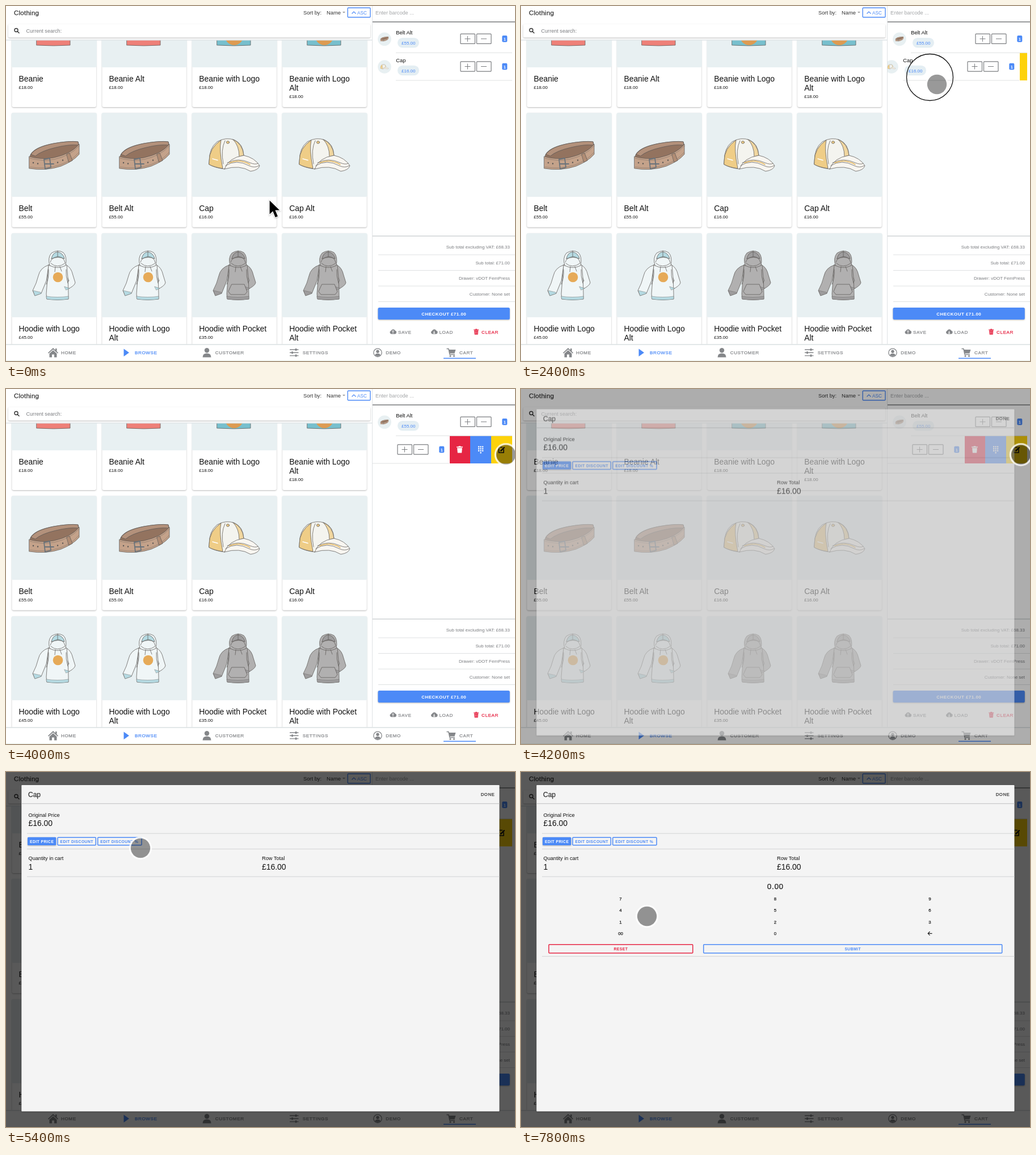
Animation, 897 px wide and 625 px high, one loop 8000 ms. Source, as an HTML page:

```html
<!DOCTYPE html>
<html lang="en">
<head>
<meta charset="utf-8">
<title>Shop till</title>
<style>
html, body { margin: 0; width: 100%; height: 100%; overflow: hidden; background: #fff; }
svg { display: block; font-family: "Liberation Sans", Arial, sans-serif; --blue: #4c8af7; --red: #e62543; --tint: #e8f0f2; }
.lift { filter: drop-shadow(0 1px 1px rgba(0, 0, 0, .28)); }
.medium { fill: currentColor; stroke: currentColor; stroke-width: .25; }
.caps { letter-spacing: .6px; font-size: 8.1px; }
.small { letter-spacing: .42px; font-size: 6.8px; font-weight: bold; }
.mid { text-anchor: middle; }
.end { text-anchor: end; }
.line { fill: none; stroke: currentColor; }
.ink { stroke: #5c5856; stroke-width: .75; stroke-linejoin: round; stroke-linecap: round; }
.lining { fill: var(--lining); }

/* Every segment advances once per 200 ms (2.5%). */
#row, #arrow, #touch, #ring, #veil, #modal, #keys { animation: 8s step-end -10ms infinite; }
#row { animation-name: swipe; }
#arrow { animation-name: point; }
#touch { animation-name: drag; }
#ring { animation-name: press; }
#veil { animation-name: dim; }
#modal { animation-name: rise; }
#keys { animation-name: reveal; }

@keyframes swipe {
  0%, 27.5% { transform: translate(0, 0); }
  30% { transform: translate(-14px, 0); animation-timing-function: steps(3); }
  37.5%, 100% { transform: translate(-111px, 0); }
}
@keyframes point {
  0% { transform: translate(464px, 341px); opacity: 1; animation-timing-function: steps(6); }
  15% { transform: translate(700px, 225px); opacity: 1; animation-timing-function: steps(4); }
  25% { transform: translate(720px, 125px); opacity: 1; }
  27.5%, 100% { transform: translate(720px, 125px); opacity: 0; }
}
@keyframes drag {
  0% { transform: translate(747px, 138px); opacity: 0; }
  27.5% { transform: translate(747px, 138px); opacity: 1; }
  30% { transform: translate(733px, 138px); opacity: 1; animation-timing-function: steps(3); }
  37.5% { transform: translate(636px, 138px); opacity: 1; }
  42.5% { transform: translate(636px, 138px); opacity: 1; animation-timing-function: steps(3); }
  50% { transform: translate(881px, 115.5px); opacity: 1; }
  60% { transform: translate(881px, 115.5px); opacity: 1; animation-timing-function: steps(2); }
  65% { transform: translate(195px, 80px); opacity: 1; }
  67.5% { transform: translate(237px, 134px); opacity: 1; }
  70% { transform: translate(237px, 134px); opacity: 1; animation-timing-function: steps(4); }
  80% { transform: translate(60px, 124px); opacity: 1; }
  85% { transform: translate(60px, 124px); opacity: 1; animation-timing-function: steps(3); }
  92.5% { transform: translate(285px, 256px); opacity: 1; }
  97.5%, 100% { transform: translate(222px, 254px); opacity: 1; }
}
@keyframes press {
  0% { r: 20px; opacity: 0; }
  27.5% { r: 20px; opacity: 1; }
  30% { r: 41px; opacity: 1; }
  32.5%, 100% { r: 41px; opacity: 0; }
}
@keyframes dim {
  0% { opacity: 0; }
  52.5% { opacity: .32; }
  55%, 100% { opacity: .65; }
}
@keyframes rise {
  0% { opacity: 0; transform: translate(0, 26px); }
  52.5% { opacity: .55; transform: translate(0, 12.6px); }
  55%, 100% { opacity: 1; transform: translate(0, 0); }
}
@keyframes reveal {
  0% { opacity: 0; }
  82.5%, 100% { opacity: 1; }
}
</style>
</head>
<body>
<svg id="stage" width="897" height="625" viewBox="0 0 897 625">
  <defs>
    <clipPath id="shelf"><path d="M0 59.500H645V595.500H0z"/></clipPath>
    <clipPath id="cart"><path d="M646 34H892.500V140H646z"/></clipPath>

    <g id="belt" class="ink">
      <path fill="#93735f" d="M42 267C42 254 62 246 84 242Q112 237 127 239L129 247L112 264 84 270Q60 273 42 267z"/>
      <path fill="#b3917b" d="M44 261C52 250 66 246 84 242Q112 237 127 239L128 245Q112 243 88 249Q62 255 52 264z"/>
      <path fill="#c4a28a" d="M41 265Q62 271 84 267Q116 260 129 243V261Q119 273 97 282Q70 291 41 286z"/>
      <path fill="none" stroke-width=".4" d="M42 268Q64 274 85 270Q115 263 128 247M42 283.500Q70 288 96 279.500Q118 271 128 258"/>
      <path fill="#b08c74" d="M107 261L112 259 117 272 111 275z"/>
      <path fill="none" stroke="#69727a" stroke-width="1.800" d="M67 270L77 268 79 284 69 287zM68 278H84"/>
      <path fill="none" stroke-width="2.400" d="M48 276h.1M56 277.500h.1M91 275.500h.1M100 271.500h.1"/>
    </g>

    <g id="cap" class="ink">
      <path fill="#f4f4ef" d="M358 273Q358 250 372 239Q388 230 403 236Q418 243 419 263Q399 267 385 287Q368 285 358 279z"/>
      <path fill="#efcd87" d="M358 273Q358 250 379 236Q375 252 382 286Q367 284 358 279z"/>
      <path fill="#f0d69f" d="M400 235Q417 242 419 263L411 265Q411 246 400 235z"/>
      <path fill="#f8f6f1" d="M385 287Q392 267 419 263Q438 267 447 281Q445 289 431 291Q412 279 385 287z"/>
      <path fill="none" d="M387 281Q406 269 428 281Q438 286 446 281M390 276Q409 266 430 276Q440 280 444 277M383 278Q378 253 386 237"/>
      <path fill="none" stroke="#e5b85f" stroke-width="1.500" d="M394 276Q412 269 430 279"/>
      <ellipse cx="391" cy="240" rx="2.600" ry="2.200" fill="#efcd87"/>
      <path fill="none" stroke="#fff" stroke-width="1.500" d="M364 269l9 2.500"/>
    </g>

    <g id="hoodie" class="ink">
      <path d="M75 456Q60 461 57 475Q54 488 47 501L51 510 62 506 71 484z"/>
      <path d="M106 456Q115 460 118 474L122 487Q121 493 106 500L101 493 111 484 107 474z"/>
      <path d="M75 456Q90 451 107 456Q110 482 110 507V516Q91 519 72 516L71 507Q73 479 75 456z"/>
      <path d="M77 457Q73 443 80 435Q91 428 101 434Q108 441 105 457Q91 464 77 457z"/>
      <path class="lining" d="M80 445Q82 434 91 433Q101 435 103 445Q92 440 80 445z"/>
      <path class="lining" stroke-width=".4" d="M71 511Q91 514 110 511V516Q91 519 72 516zM48 501L61 504 62 506 51 510zM103 494L112 497 106 500z"/>
      <path fill="none" d="M78 451Q80 443 92 441Q103 443 104 452M91 431V441M79 453Q90 463 104 453M87 459L86 468M95 459L98 467M75 464Q76 479 71 490M106 464Q105 475 109 488"/>
    </g>
    <g id="light" fill="#f0f6f7" style="--lining:#b5dae2">
      <use href="#hoodie"/>
      <circle cx="91.500" cy="477.500" r="8.800" fill="#e6aa58"/>
    </g>
    <g id="grey" fill="#b1b0b0" style="--lining:#9d9c9d">
      <use href="#hoodie"/>
      <path class="ink" d="M80 490H102L107 503 103 508H78L74 503z"/>
    </g>
    <path id="beanie" class="ink" d="M54 50H113V69Q84 71 54 69z"/>
    <g id="beanieLogo"><use href="#beanie"/><circle cx="84" cy="53" r="16" fill="#dd9b52"/></g>
  </defs>

  <rect width="897" height="625" fill="#fff"/>
  <g id="grid" clip-path="url(#shelf)"></g>
  <g id="head"></g>
  <g id="side"></g>
  <g id="tabs"></g>
  <rect id="veil" width="897" height="625"/>
  <g id="modal"></g>

  <circle id="ring" cx="720.500" cy="125.500" r="41" fill="none" stroke="#111" stroke-width="1.300"/>
  <g id="touch">
    <circle r="18.500" fill="none" stroke="#fff" stroke-opacity=".8" stroke-width="3.500"/>
    <circle r="17.200" fill="#000" fill-opacity=".4"/>
  </g>
  <path id="arrow" class="lift" d="M0 0V27l6-5.800 4.300 10.500 5.400-2.200-4.400-10.400H19.500z" stroke="#fff" stroke-width="1.200"/>
</svg>

<script>
const put = (id, ...parts) => document.getElementById(id).innerHTML = parts.flat(9).join('');
const text = (x, y, s, size, color = '#111', cls = '') =>
  `<text x="${x}" y="${y}" class="${cls}" ${size ? `font-size="${size}"` : ''} fill="${color}" color="${color}">${s}</text>`;
const caps = (x, y, s, color = '#85878a') => text(x, y, s, 0, color, 'medium caps');
const rect = (x, y, w, h, fill, more = '') => `<rect x="${x}" y="${y}" width="${w}" height="${h}" fill="${fill}" ${more}/>`;
const box = (x, y, w, h, color, width = 1.4) => rect(x, y, w, h, 'none', `stroke="${color}" stroke-width="${width}" rx="1"`);
const line = (d, color = '#dfe1e2', width = 1) => `<path class="line" d="${d}" color="${color}" stroke-width="${width}"/>`;
const shape = (d, fill) => `<path d="${d}" fill="${fill}"/>`;
const art = (name, dx = 0, more = '') => `<use href="#${name}" x="${dx}" ${more}/>`;
const BLUE = 'var(--blue)', RED = 'var(--red)', TINT = 'var(--tint)', GREY = '#7b7d80';

// Product cards
const shelves = [
  { top: -40, h: 218, price: ['18', '18', '18', '18'], titles: ['Beanie', 'Beanie Alt', 'Beanie with Logo', 'Beanie with Logo|Alt'],
    art: [['beanie', 0, 'fill="#ee8078"'], ['beanie', 159, 'fill="#ee8078"'], ['beanieLogo', 318, 'fill="#77bfcd"'], ['beanieLogo', 477, 'fill="#77bfcd"']] },
  { top: 188, h: 201.5, price: ['55', '55', '16', '16'], titles: ['Belt', 'Belt Alt', 'Cap', 'Cap Alt'],
    art: [['belt', 0], ['belt', 159], ['cap', 0], ['cap', 159]] },
  { top: 400, h: 218, price: ['45', '45', '35', '35'], titles: ['Hoodie with Logo', 'Hoodie with Logo|Alt', 'Hoodie with Pocket', 'Hoodie with Pocket|Alt'],
    art: [['light', 0], ['light', 159], ['grey', 318], ['grey', 477]] }
];
const card = (shelf, i) => {
  const x = 10.5 + i * 158.9, y = shelf.top + 173, words = shelf.titles[i].split('|');
  return [
    rect(x, shelf.top, 148.5, shelf.h, '#fff', 'rx="3" class="lift"'),
    rect(x - 1, shelf.top, 150.5, 148, TINT, 'rx="3"'),
    art(...shelf.art[i]),
    words.map((w, n) => text(x + 12, y + n * 16, w, 13.9)),
    text(x + 12, y - 3.5 + words.length * 16, `£${shelf.price[i]}.00`, 8)
  ];
};
put('grid', shelves.map(s => s.titles.map((_, i) => card(s, i))));

put('head',
  rect(0, 0, 645, 59.5, '#fff'), line('M0 60H645', '#dfe5e7', 1.5),
  text(14, 16, 'Clothing', 11.5, '#333', 'medium" letter-spacing=".25'),
  text(524, 15, 'Sort by:', 9.3, '#333'), text(565, 15, 'Name', 9.4, '#333'),
  shape('M593 10h5l-2.500 2.500z', '#999'),
  box(602.2, 3.2, 39.8, 16.6, BLUE), line('M609.500 13.500l3.500-3.500 3.500 3.500', BLUE, 1.2),
  text(619, 15, 'ASC', 8.2, BLUE),
  rect(4, 32, 638, 23.5, '#fff', 'rx="2" class="lift"'),
  line('M21 42.500a3 3 0 1 1-6 0a3 3 0 1 1 6 0M20.200 44.800l3.300 3.300', '#333', 1.4),
  text(35.5, 47, 'Current search:', 9.1, GREY));

// Cart column
const item = (y, name, price, pic, cx, cy) => [
  `<circle cx="667" cy="${y + 24.3}" r="11.800" fill="${TINT}"/>`,
  art(pic, 0, `transform="translate(667 ${y + 24.3}) scale(.160) translate(${-cx} ${-cy})"`),
  text(687.3, y + 16, name, 9.4),
  rect(690, y + 22, 38, 17.5, '#e4eef3', 'rx="8.700"'), text(697, y + 34, price, 8, BLUE),
  box(801, y + 15.2, 25.5, 17.2, GREY, 1.2), box(829.5, y + 15.2, 25.5, 17.2, GREY, 1.2),
  line(`M808.500 ${y + 23.8}h10M813.500 ${y + 18.8}v10M837 ${y + 23.8}h10`, GREY, 1),
  rect(874.3, y + 18, 9, 11.5, BLUE, 'rx="2"'),
  text(878.8, y + 26.8, '1', 7.5, '#fff', 'mid" font-weight="bold'),
  line(`M687 ${y + 48.3}H892`)
];
const trash = (x, y, s, color) =>
  `<g transform="translate(${x} ${y}) scale(${s})">${shape('M-4 -3h8l-.7 8h-6.600zM-5 -5h3l.5-1h3l.5 1h3v1.300h-10z', color)}${line('M-1.500 -1.500v5M1.500 -1.500v5', '#fff', .7)}</g>`;
const cloud = (x, dir) => shape(`M${x - 3} 577.500a3 3 0 0 1-.5-5.800a4 4 0 0 1 7.300-.3a3.100 3.100 0 0 1-.4 6.100z`, '#85878a')
  + line(`M${x} 576.500v-4.500M${x - 1.7} ${574 + dir}l1.700 ${dir * 1.7} 1.700 ${-dir * 1.7}`, '#fff', 1);
const dots = [0, 1, 2].map(c => [0, 1, 2].map(r => rect(831.9 + c * 3.5, 100.5 + r * 3.5, 2.4, 2.4, '#fff', 'rx="1"')));
const totals = ['Sub total excluding VAT: £68.33', 'Sub total: £71.00', 'Drawer: vDOT FernPress', 'Customer: None set'];

put('side',
  line('M645.500 0V595', '#dfe2e4'),
  text(651, 15, 'Enter barcode ...', 9.2, '#a3a5a7'), line('M646 28H897', '#77797b', 1.3),
  '<g clip-path="url(#cart)">',
  rect(781, 82.5, 37, 48.5, RED), rect(818, 82.5, 37, 48.5, BLUE), rect(855, 82.5, 37, 48.5, '#fdd20b'),
  trash(799.5, 107, 1.1, '#fff'), dots, rect(835.4, 111, 2.4, 2.4, '#fff', 'rx="1"'),
  line('M875 102.500H868.500V112H877V106', '#111', 1.6), line('M871.500 109.500L878.500 102.500', '#111', 2.4),
  '<g id="row">', rect(600, 82, 293, 49.5, '#fff'), item(82.7, 'Cap', '£16.00', 'cap', 402, 262), '</g></g>',
  item(34, 'Belt Alt', '£55.00', 'belt', 85, 264),
  line('M646 405H897', '#cfd3d5', 1.4),
  totals.map((s, i) => text(888, 427 + i * 27.5, s, 8, GREY, 'end') + line(`M656 ${438 + i * 27.5}H897`)),
  rect(655.5, 531, 232.3, 21, BLUE, 'rx="2.500" class="lift"'),
  text(771.7, 544.6, 'CHECKOUT £71.00', 8, '#fff', 'mid" font-weight="bold" letter-spacing=".47'),
  cloud(682, -1), caps(691, 577, 'SAVE'), cloud(754.5, 1), caps(763.5, 577, 'LOAD'),
  trash(828.7, 574, .9, RED), caps(838, 577, 'CLEAR', RED));

// Bottom tabs
const G = '#85878a';
put('tabs',
  rect(0, 596, 897, 29, '#fff'), line('M0 596H897', '#d9dfe0', 1.3), line('M0 624.500H897', '#eaf0ea'),
  shape('M74 610.500L83 602 87 605.700V603H89.500V608L92 610.500 91 611.700 83 604.500 75 611.700zM76.500 612L83 606 89.500 612V618.500H85V613.500H81V618.500H76.500z', G),
  caps(97, 613.3, 'HOME'),
  shape('M207.500 603.500L217 610.200 207.500 617z', BLUE), caps(227, 613.3, 'BROWSE', BLUE),
  `<circle cx="354" cy="606.300" r="4.200" fill="${G}"/>`, shape('M346.500 618.500Q346.500 611.500 354 611.500T361.500 618.500z', G),
  caps(368.7, 613.3, 'CUSTOMER'),
  line('M500 605H515.500M500 610.300H515.500M500 615.600H515.500', G, 1.4),
  line('M511 603v4M504.500 608.300v4M511 613.600v4', G, 2.6), caps(522.7, 613.3, 'SETTINGS'),
  `<circle cx="655" cy="610.300" r="7.200" fill="none" stroke="${G}" stroke-width="1.300"/><circle cx="655" cy="608.300" r="2.700" fill="${G}"/>`,
  shape('M650 615Q651 611.700 655 611.700T660 615Q655 618.500 650 615z', G), caps(669.3, 613.3, 'DEMO'),
  line('M776.500 603.500H780L782 613.500H791', G, 1.5), shape('M780.500 605H792.500L790.500 611.500H781.700z', G),
  `<circle cx="783" cy="616.300" r="1.500" fill="${G}"/><circle cx="789.500" cy="616.300" r="1.500" fill="${G}"/>`,
  caps(799, 613.3, 'CART'), line('M771 620.300H828', BLUE, 1.5));

// Price editor
const INK = '#222', RULE = '#d3d4d5';
const pill = (x, w, s) => box(x, 115.2, w, 13.6, BLUE, 1.5) + text(x + 4.5, 124.6, s, 0, BLUE, 'small');
const wide = (x, w, s, color) => box(x, 303.8, w, 15, color, 1.5)
  + text(x + w / 2, 314.2, s, 0, color, 'small mid');
const keys = ['7', '8', '9', '4', '5', '6', '1', '2', '3', '00', '0'];

put('modal',
  rect(27.3, 23, 842.2, 574.5, '#f4f4f4', 'rx="1" class="lift"'),
  text(39, 44, 'Cap', 12, '#333', 'medium'), caps(836.7, 42, 'DONE', '#333').replace('caps', 'caps" style="font-size:7.7px'),
  line('M27.500 55.700H869.500', '#c9cacb', 1.2),
  text(39.5, 79, 'Original Price', 9.2), text(39.5, 95.3, '£16.00', 13.9),
  line('M37 108.200H869.500', RULE),
  rect(38, 114.7, 50.3, 14.3, BLUE, 'rx="1.500" class="lift"'), text(42, 124.6, 'EDIT PRICE', 0, '#fff', 'small'),
  pill(91, 67.3, 'EDIT DISCOUNT'), pill(161.7, 77.3, 'EDIT DISCOUNT %'),
  line('M37 135.600H869.500', RULE),
  text(39.5, 155, 'Quantity in cart', 9.2), text(39.5, 171.7, '1', 13.9),
  text(451, 155, 'Row Total', 9.2), text(451, 171.7, '£16.00', 13.9),
  line('M37 184.200H869.500', RULE),
  '<g id="keys">',
  text(448.3, 206, '0.00', 13.5, INK, 'medium mid" letter-spacing=".700'),
  keys.map((k, i) => text(175.5 + i % 3 * 272.5, 226.2 + Math.floor(i / 3) * 20.2, k, 7.8, INK, 'medium mid')),
  line('M724.500 284.300H717.500M720.500 281L717.200 284.300 720.500 287.600', INK, 1.2),
  wide(49, 253.7, 'RESET', RED), wide(321.7, 526, 'SUBMIT', BLUE),
  line('M37 324.600H869.500', RULE),
  '</g>');
</script>
</body>
</html>
```
